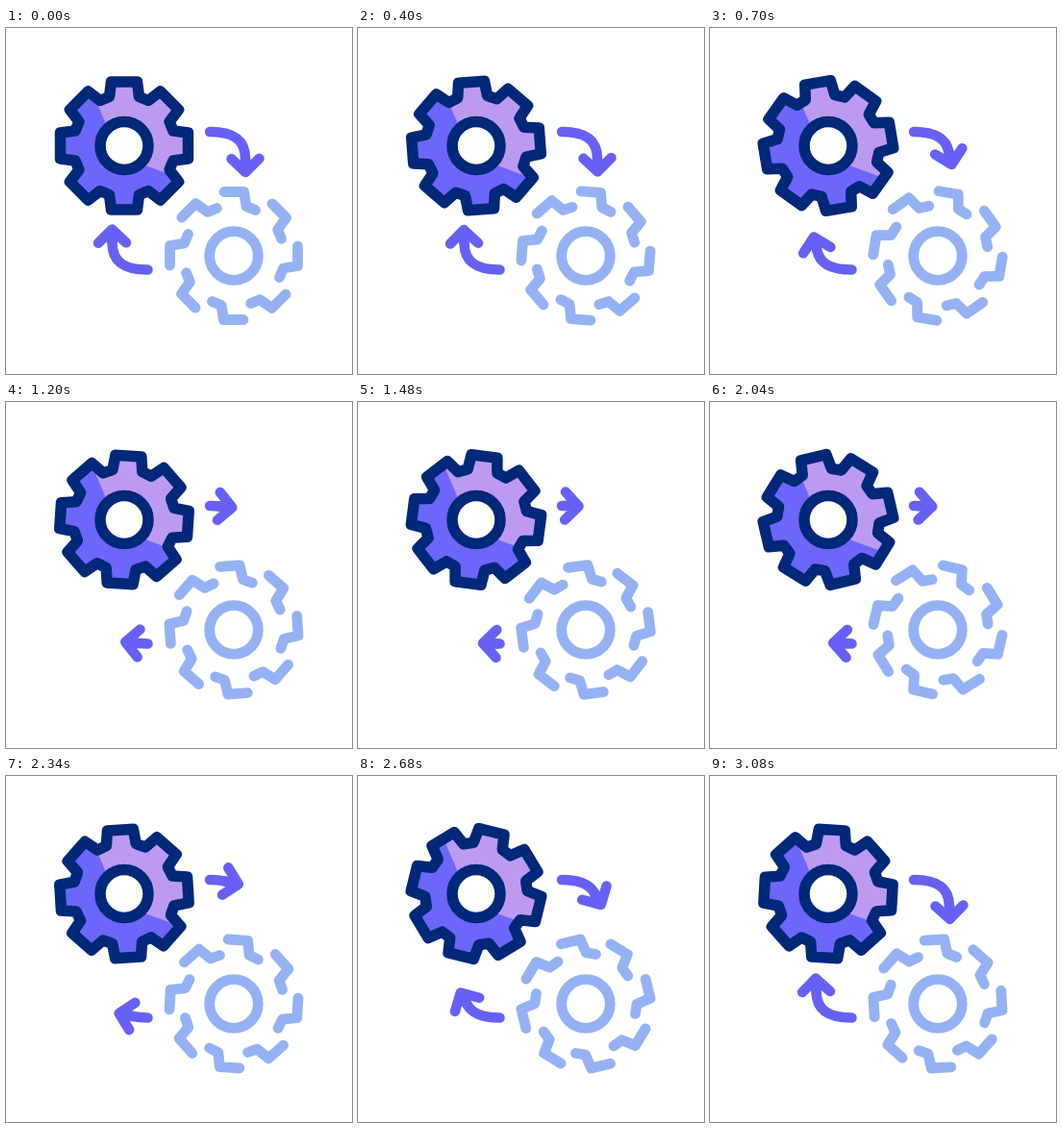
An HTML page that plays this animation: 360x360 px, repeating every 3100 ms.

```html
<!DOCTYPE html>
<html>
<head>
<meta charset="utf-8">
<style>
  html, body { margin: 0; width: 100%; height: 100%; overflow: hidden; background: #fff; }
  svg { display: block; width: 100vw; height: 100vh; }
  path, circle { fill: none; stroke-linecap: round; stroke-linejoin: round; }
</style>
</head>
<body>
<svg viewBox="0 0 360 360">
  <defs>
    <clipPath id="body"><path id="clip"/></clipPath>
    <g id="arrow" stroke="#6760f5" stroke-width="10.5">
      <path id="track" d="M212 108C232 108 249 113 249 136"/>
      <path id="head" d="M0 0H14M0-14.5L14 0L0 14.5"/>
    </g>
  </defs>
  <g clip-path="url(#body)">
    <path d="M40 40H206V206H40z" style="fill:#6d66fa"/>
    <path d="M92 40V72L104 100L123 123L145 143L175 154L206 160V40z" style="fill:#bc9af2"/>
  </g>
  <path id="gear" stroke="#002878" stroke-width="11.5"/>
  <circle cx="123" cy="122.5" r="25" stroke="#002878" stroke-width="11.5" style="fill:#fff"/>
  <g stroke="#94b2f3" stroke-width="10.8">
    <path id="pieces"/>
    <circle cx="237" cy="237" r="25.3"/>
  </g>
  <use href="#arrow"/>
  <use href="#arrow" transform="rotate(180 179.75 179.75)"/>
</svg>
<script>
const $ = id => document.getElementById(id);
const LOOP = 3100;

// Repeats a point list eight times around the origin.
const around = points => [...Array(8).keys()].map(i => {
  const a = i * Math.PI / 4, c = Math.cos(a), s = Math.sin(a);
  return points.map(([x, y]) => `${(x * c - y * s).toFixed(2)} ${(x * s + y * c).toFixed(2)}`).join("L");
});
const outline = "M" + around([[-15.5, -51], [-13.5, -66.5], [13.5, -66.5], [15.5, -51]]).join("L") + "z";
$("gear").setAttribute("d", outline);
$("clip").setAttribute("d", outline);
$("pieces").setAttribute("d", "M" + around([[-10, -66.5], [10.5, -66.5], [13, -51.5], [22.5, -47.5]]).join("M"));

// Symmetric ease between two moments.
const ease = (ms, from, to, power) => {
  const t = Math.min(1, Math.max(0, (ms - from) / (to - from)));
  return t < .5 ? (2 * t) ** power / 2 : 1 - (2 - 2 * t) ** power / 2;
};

const track = $("track"), length = track.getTotalLength();
const place = (id, x, y, angle) =>
  $(id).setAttribute("transform", `translate(${x} ${y}) rotate(${angle})`);

function draw(ms) {
  // Two turns: the arrows shrink during the first and grow during the second.
  const first = ease(ms, 118, 1754, 3.5), second = ease(ms, 1796, 3254, 2.2);
  const angle = -356.5 * first - 368 * second;
  place("gear", 123, 122.5, angle);
  place("clip", 123, 122.5, angle);
  place("pieces", 237, 237, -angle);

  const reach = 3 + (length - 3) * (1 - first + second);
  const p = track.getPointAtLength(reach), q = track.getPointAtLength(reach - 1);
  track.setAttribute("stroke-dasharray", `${reach} 200`);
  place("head", p.x, p.y, Math.atan2(p.y - q.y, p.x - q.x) * 180 / Math.PI);
}

const start = performance.now();
function tick() {
  draw((performance.now() - start) % LOOP);
  requestAnimationFrame(tick);
}
tick();
</script>
</body>
</html>
```
